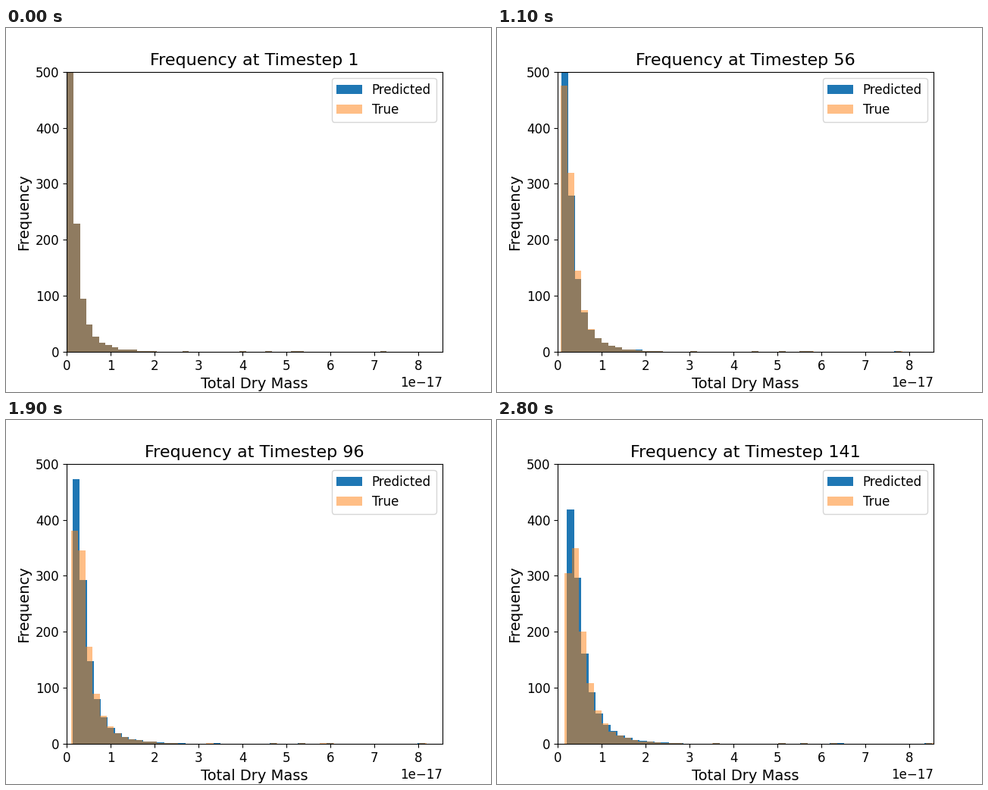
Recreate the animation shown at these times as a matplotlib script. Size 640 by 480 pixels, loop 2900 ms.

```python
import math

import numpy as np
import matplotlib.pyplot as plt
from matplotlib.animation import FuncAnimation

FRAMES, INTERVAL, BINS = 29, 100, 50
CELLS = 1140
UNIT = 1e-17
X_MAX = 8.545

plt.rcParams.update({
    "font.family": "DejaVu Sans",
    "font.size": 12,
    "axes.titlesize": 16,
    "axes.labelsize": 14,
})


def start_masses():
    """Evenly spaced lognormal quantiles plus a few very heavy cells."""
    z = np.linspace(-4, 4, 2001)
    cdf = [(1 + math.erf(v / math.sqrt(2))) / 2 for v in z]
    quantiles = (np.arange(CELLS) + 0.5) / CELLS
    masses = 0.1119 * np.exp(1.175 * np.interp(quantiles, cdf, z))
    heavy = [2.70, 4.05, 4.60, 5.14, 5.25, 7.268]
    return np.append(masses[masses < 2.03], heavy)


MASSES = start_masses()


def grow(t, drift, gain, knee, rate):
    """Masses at progress t: a common drift plus growth that slows with mass."""
    growth = gain * np.log1p(MASSES / knee) + rate * MASSES
    return MASSES + 0.01 + drift * t**1.15 + growth * t**0.85


def histogram(t, law):
    counts, edges = np.histogram(grow(t, **law), bins=BINS)
    return counts, edges * UNIT


def make_bars(law, **style):
    counts, edges = histogram(0, law)
    return ax.bar(edges[:-1], counts, np.diff(edges), align="edge", **style)


predicted = dict(drift=0.19, gain=0.207, knee=0.129, rate=0.027)
true = dict(drift=0.133, gain=0.103, knee=0.024, rate=0.075)

fig, ax = plt.subplots(figsize=(6.4, 4.8), dpi=100)
ax.set_xlabel("Total Dry Mass")
ax.set_ylabel("Frequency")
title = ax.set_title("")

layers = [
    (predicted, make_bars(predicted, color="tab:blue", label="Predicted")),
    (true, make_bars(true, color="tab:orange", alpha=0.5, label="True")),
]
ax.set_xlim(0, X_MAX * UNIT)
ax.set_ylim(0, 500)
ax.legend(loc="upper right")


def update(frame):
    title.set_text(f"Frequency at Timestep {1 + 5 * frame}")
    for law, bars in layers:
        counts, edges = histogram(frame / (FRAMES - 1), law)
        for bar, n, left, right in zip(bars, counts, edges, edges[1:]):
            bar.set_bounds(left, 0, right - left, n)
    return [title]


anim = FuncAnimation(fig, update, frames=FRAMES, interval=INTERVAL,
                     repeat=True, repeat_delay=0, blit=False)
plt.show()
```
